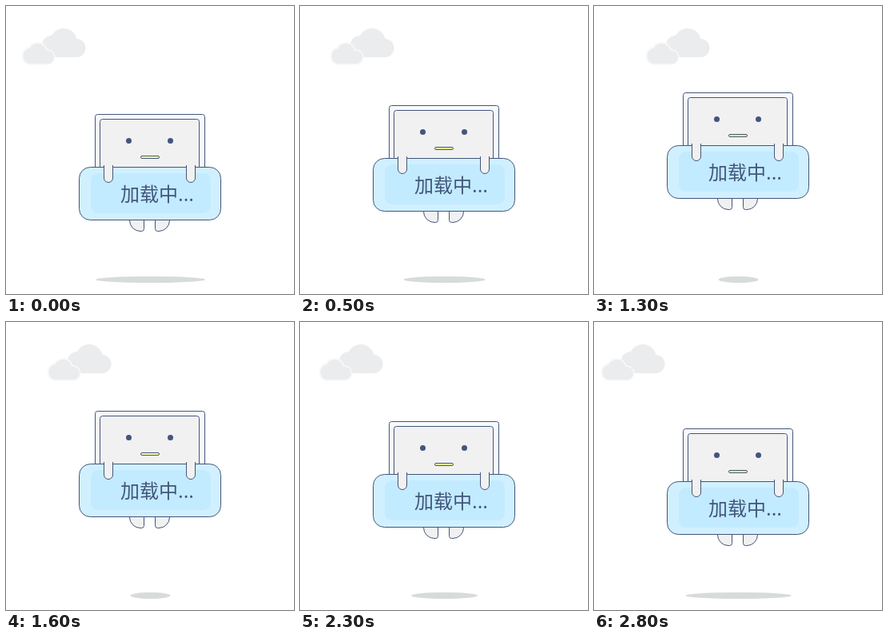
An HTML page with a canvas for the animation above (2900 ms loop, 360 by 360 pixels).

```html
<!DOCTYPE html>
<html lang="zh">
<head>
<meta charset="utf-8">
<title>加载中</title>
<style>
html, body { margin: 0; width: 100%; height: 100%; overflow: hidden; background: #fff; }
canvas { display: block; width: 360px; height: 360px; }
</style>
</head>
<body>
<canvas id="stage"></canvas>
<script>
const LOOP = 2900, STEP = 100, SIZE = 360;
const RISE_END = 1300, FALL_START = 1400;
const INK = '#43567c', PALE = '#f1f1f1';
const canvas = document.getElementById('stage');
const ctx = canvas.getContext('2d');
const dpr = window.devicePixelRatio || 1;
canvas.width = canvas.height = SIZE * dpr;

// Height of the hover, from 0 on the ground to 1 at the top
function hover(t) {
  return Math.min(1, t / RISE_END, (LOOP - t) / (LOOP - FALL_START));
}

// The rise advances in 15 whole ticks
function riseTicks(t) {
  return Math.round(15 * hover(t));
}

function lerp(t, t0, t1, a, b) {
  return a + (b - a) * (t - t0) / (t1 - t0);
}

// Clouds drift right in even ticks, hurry back, then slow down
function drift(t) {
  if (t <= FALL_START) return 3 * riseTicks(t);
  if (t < 1900) return lerp(t, FALL_START, 1900, 45, 13);
  if (t < 2300) return lerp(t, 1900, 2300, 13, 4);
  return lerp(t, 2300, 2800, 4, -11);
}

// The shadow shrinks evenly and grows back late, with an ease-in
function shadowWidth(t) {
  if (t <= FALL_START) return 137 - 5.8 * riseTicks(t);
  const grow = Math.max(0, (t - 1700) / 1140);
  return 50 + 87 * grow ** 1.5;
}

function paint(fill, stroke) {
  if (fill) { ctx.fillStyle = fill; ctx.fill(); }
  if (stroke) { ctx.strokeStyle = stroke; ctx.stroke(); }
}

function box(x, y, w, h, r, fill, stroke) {
  ctx.beginPath();
  ctx.roundRect(x, y, w, h, r);
  paint(fill, stroke);
}

function disc(x, y, r, fill) {
  ctx.beginPath();
  ctx.arc(x, y, r, 0, Math.PI * 2);
  paint(fill);
}

function bigCloud(color) {
  disc(72, 45, 17, color);
  disc(88, 52.5, 11.5, color);
  disc(57, 49, 12, color);
  box(46, 44, 52, 20, 10, color);
}

function smallCloud(grow, color) {
  disc(39.5, 58, 11 + grow, color);
  disc(31, 62.5, 9.5 + grow, color);
  disc(52, 64, 8 + grow, color);
  box(22 - grow, 56 - grow, 37 + 2 * grow, 16 + 2 * grow, 8 + grow, color);
}

function clouds(dx) {
  ctx.save();
  ctx.translate(dx, 0);
  bigCloud('#ebecee');
  smallCloud(1.7, '#f7f8f9');
  smallCloud(0, '#ebecee');
  ctx.restore();
}

function foot(x, dir) {
  ctx.save();
  ctx.translate(x, 0);
  ctx.scale(dir, 1);
  ctx.beginPath();
  ctx.moveTo(0, 266);
  ctx.arcTo(0, 281.5, 18, 281.5, 13.5);
  ctx.arcTo(18, 281.5, 18, 266, 3);
  ctx.lineTo(18, 266);
  paint(PALE, INK);
  ctx.restore();
}

function hand(x) {
  ctx.beginPath();
  ctx.moveTo(x, 199);
  ctx.lineTo(x, 215);
  ctx.arc(x + 5.5, 215, 5.5, Math.PI, 0, true);
  ctx.lineTo(x + 11, 199);
  paint(PALE, INK);
}

function robot(dy) {
  ctx.save();
  ctx.translate(0, -dy);
  ctx.lineWidth = 1;
  foot(154.5, 1);
  foot(204.5, -1);
  box(111.5, 135.5, 137, 90, 3, '#f8f9fb', INK);
  box(117.5, 141.5, 124, 80, 3, PALE, INK);
  disc(153.5, 168.5, 3.5, INK);
  disc(205.5, 168.5, 3.5, INK);
  box(168.5, 187.5, 23, 3, 1.5, '#ffff99', INK);
  box(91.5, 201.5, 177, 66, 14, '#d1f0ff', INK);
  box(106, 209, 150, 50, 9, '#c2ebff');
  hand(122.5);
  hand(225.5);
  ctx.fillStyle = INK;
  ctx.font = '350 24px "Noto Sans CJK SC", "Noto Sans CJK", sans-serif';
  ctx.fillText('加载中...', 143, 244);
  ctx.restore();
}

function draw(ms) {
  const t = Math.floor(ms % LOOP / STEP) * STEP;
  ctx.setTransform(dpr, 0, 0, dpr, 0, 0);
  ctx.fillStyle = '#fff';
  ctx.fillRect(0, 0, SIZE, SIZE);
  clouds(Math.round(drift(t)));
  ctx.beginPath();
  ctx.ellipse(180.5, 342, shadowWidth(t) / 2, 4, 0, 0, Math.PI * 2);
  paint('#d7dbd9');
  robot(Math.ceil(27 * hover(t)));
}

const start = performance.now();
function tick() {
  draw(performance.now() - start);
  requestAnimationFrame(tick);
}
tick();
</script>
</body>
</html>
```
